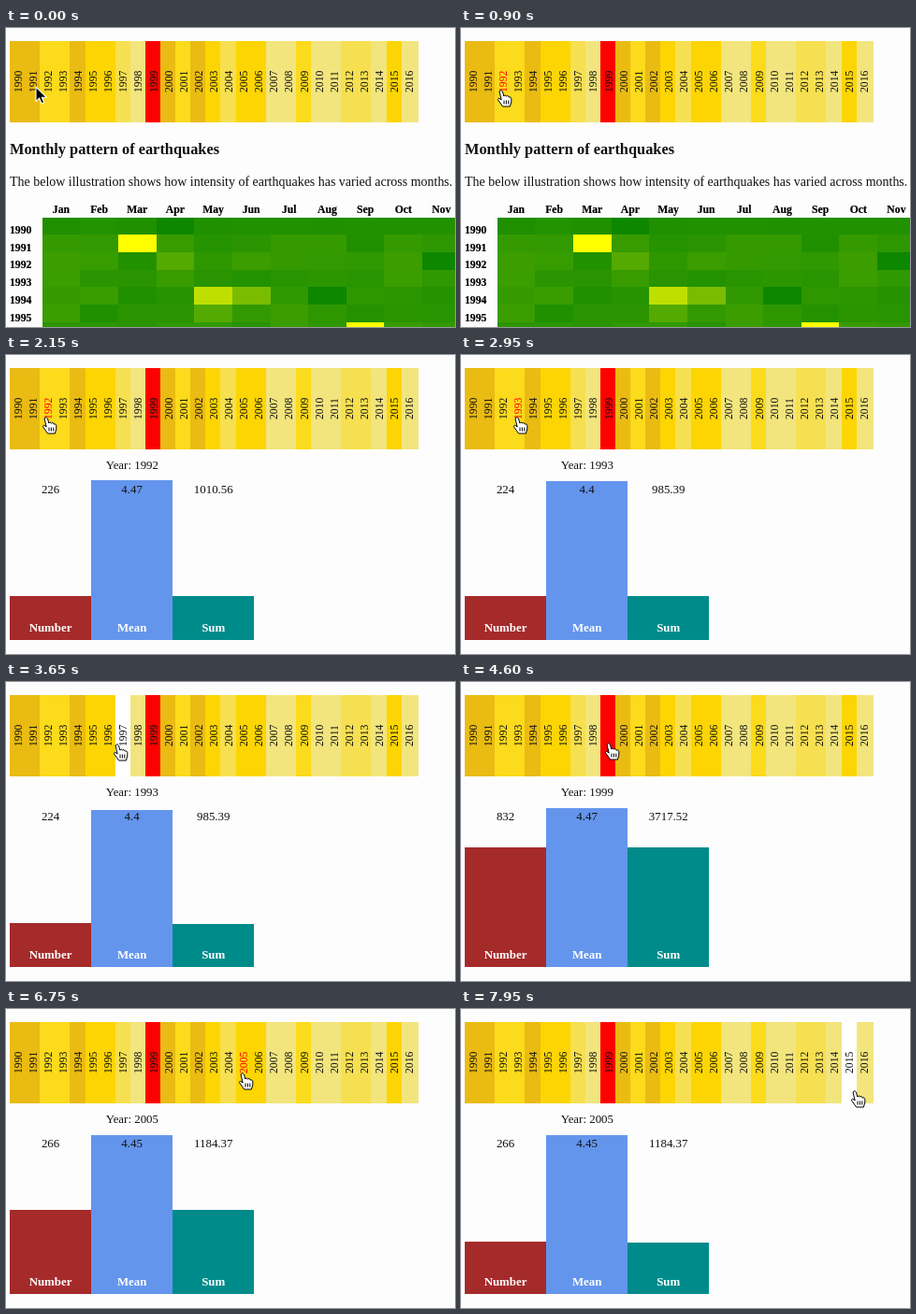
Write an HTML page that moves like this. It is 480 px wide and 320 px high and loops after 8 s.

```html
<!DOCTYPE html>
<html lang="en">
<head>
<meta charset="utf-8">
<title>Earthquakes by year</title>
<style>
html, body { margin: 0; width: 100%; height: 100%; overflow: hidden; background: #fefdfe; }
svg { display: block; width: 480px; height: 320px; font-family: "Liberation Serif", "Times New Roman", serif; fill: #111; }
.year { font-size: 11.7px; }
.grid { font-size: 11.7px; font-weight: bold; fill: #000; }
.grid text { stroke: #000; stroke-width: .2px; }
.mid { text-anchor: middle; }
.bars { font-size: 12.9px; }
.name { font-weight: bold; fill: #fff; }
rect { shape-rendering: crispEdges; }
</style>
</head>
<body>
<svg id="stage" viewBox="0 0 480 320"></svg>
<script>
const LOOP = 8000;
const LEFT = 4;
const stage = document.getElementById('stage');

function add(parent, tag, attrs, text) {
  const node = document.createElementNS('http://www.w3.org/2000/svg', tag);
  for (const key in attrs) node.setAttribute(key, attrs[key]);
  if (text !== undefined) node.textContent = text;
  parent.appendChild(node);
  return node;
}
const lerp = (a, b, k) => a + (b - a) * k;
const mix = (a, b, k) => `rgb(${a.map((v, i) => Math.round(lerp(v, b[i], k)))})`;

// Year strip: each cell is a little wider than its step, so the next one overlaps it
const FIRST = 1990, YEARS = 27, STEP = 16.1, CELL = 18.5;
const KHAKI = [240, 230, 140], GOLD = [255, 215, 0], ROD = [218, 165, 32];
const tiers = [
  { color: '#f00', years: [1999] },
  { color: mix(GOLD, ROD, .57), years: [1990, 1991, 1994, 2000, 2002] },
  { color: mix(GOLD, ROD, .05), years: [1995, 1996, 2003, 2005, 2006, 2015] },
  { color: mix(KHAKI, GOLD, .8), years: [1992, 1993, 2001, 2009] },
  { color: mix(KHAKI, GOLD, .42), years: [1997, 2004, 2012, 2013] }
];
const quiet = { color: mix(KHAKI, GOLD, .1) };
const strip = add(stage, 'g', {});
const cells = Array.from({ length: YEARS }, (_, i) => {
  const x = LEFT + i * STEP;
  const { color } = tiers.find(tier => tier.years.includes(FIRST + i)) || quiet;
  return { x, color, rect: add(strip, 'rect', { x, y: 14, width: CELL, height: 87 }) };
});
cells.forEach((cell, i) => {
  const transform = `translate(${cell.x + 12.6} 69) rotate(-90)`;
  cell.label = add(strip, 'text', { class: 'year', transform }, FIRST + i);
});

// Monthly table
const table = add(stage, 'g', {});
add(table, 'text', { x: LEFT, y: 135, 'font-size': 16.36, 'font-weight': 'bold' }, 'Monthly pattern of earthquakes');
add(table, 'text', { x: LEFT, y: 169, 'font-size': 13.98 },
  'The below illustration shows how intensity of earthquakes has varied across months.');

const grid = add(table, 'g', { class: 'grid' });
const GRID_X = 38.6, GRID_Y = 202.5, COL = 40.65, ROW = 18.7;
const months = 'Jan Feb Mar Apr May Jun Jul Aug Sep Oct Nov'.split(' ');
const peaks = {
  'Mar 1991': 1, 'Sep 1996': 1, 'May 1994': .75, 'Jun 1994': .48,
  'Apr 1992': .33, 'May 1995': .33, 'Apr 1990': .05, 'Nov 1992': .05, 'Aug 1994': .05
};
let seed = 7;
const random = () => (seed = seed * 16807 % 2147483647) / 2147483647;

months.forEach((month, c) =>
  add(grid, 'text', { class: 'mid', x: GRID_X + (c + .5) * COL, y: 198 }, month));
for (let r = 0; r < 7; r++) {
  const year = FIRST + r;
  months.forEach((month, c) => {
    const level = peaks[month + ' ' + year] ?? .12 + (r ? .12 : .02) * random();
    add(grid, 'rect', {
      x: GRID_X + c * COL, y: GRID_Y + r * ROW, width: COL, height: ROW,
      fill: mix([0, 128, 0], [255, 255, 0], level)
    });
  });
  add(grid, 'text', { x: LEFT, y: GRID_Y + 17.5 + r * ROW }, year);
}

// Bar chart
const chart = add(stage, 'g', { class: 'bars mid' });
const FLOOR = 305, FULL = 174, BAR = 87.1, GROW = 1000;
const title = add(chart, 'text', { x: 134.8, y: 122 });
const bars = [['Number', '#a52a2a', 832], ['Mean', '#6495ed', 4.55], ['Sum', '#008b8b', 3717.52]]
  .map(([name, fill, max], i) => {
    const x = LEFT + i * BAR, mid = x + BAR / 2;
    const rect = add(chart, 'rect', { x, width: BAR, fill });
    add(chart, 'text', { class: 'name', x: mid, y: 296 }, name);
    return { rect, max, value: add(chart, 'text', { x: mid, y: 148 }) };
  });
const picks = [
  { at: 1100, year: 1992, values: [226, 4.47, 1010.56] },
  { at: 2600, year: 1993, values: [224, 4.4, 985.39] },
  { at: 4050, year: 1999, values: [832, 4.47, 3717.52] },
  { at: 6170, year: 2005, values: [266, 4.45, 1184.37] }
];
const cubicInOut = k => k < .5 ? 4 * k ** 3 : 1 - 4 * (1 - k) ** 3;

function drawChart(t) {
  const current = picks.findLastIndex(pick => t >= pick.at);
  table.style.display = current < 0 ? '' : 'none';
  chart.style.display = current < 0 ? 'none' : '';
  if (current < 0) return;
  const { at, year, values } = picks[current];
  const before = current ? picks[current - 1].values : [0, 0, 0];
  const k = cubicInOut(Math.min(1, (t - at) / GROW));
  title.textContent = 'Year: ' + year;
  bars.forEach((bar, i) => {
    const height = lerp(before[i], values[i], k) / bar.max * FULL;
    bar.rect.setAttribute('y', FLOOR - height);
    bar.rect.setAttribute('height', height);
    bar.value.textContent = values[i];
  });
}

// Pointer
const arrow = add(stage, 'path', {
  d: 'M0 0V15.5L3.6 12.2L6 17.8L8.7 16.6L6.3 11.2H11.2Z', fill: '#000', stroke: '#fff', 'stroke-width': 1.1
});
const hand = add(stage, 'path', {
  d: 'M-2 1Q0-2 1.5 1L2.8 6Q4 3.5 5.4 6Q7 4 8.2 7Q10 6 10.8 8.5V12L9.4 17H1.6L-3.6 9.6Q-3 7-1 9L.2 10Z' +
     'M3 10.5v4m2.4-4v4m2.4-4v4',
  fill: '#fff', stroke: '#000', 'stroke-linejoin': 'round'
});
const stops = [
  { from: 0, to: 350, x: 32, y: 63 },
  { from: 700, to: 2250, x: 43, y: 67 },
  { from: 2500, to: 3250, x: 60, y: 67 },
  { from: 3500, to: 3700, x: 119, y: 67 },
  { from: 3950, to: 5100, x: 158, y: 66 },
  { from: 5350, to: 5500, x: 237, y: 64 },
  { from: 5800, to: 6950, x: 253, y: 69 },
  { from: 7450, to: LOOP, x: 421, y: 88 }
];

function pointerAt(t) {
  const i = stops.findIndex(stop => t <= stop.to);
  const stop = stops[i];
  if (t >= stop.from) return [stop.x, stop.y];
  const last = stops[i - 1];
  const k = (t - last.to) / (stop.from - last.to);
  return [lerp(last.x, stop.x, k), lerp(last.y, stop.y, k)];
}

function drawPointer(t) {
  const [x, y] = pointerAt(t);
  const isArrow = t < 500 || (t > 5150 && t < 5600);
  arrow.style.display = isArrow ? '' : 'none';
  hand.style.display = isArrow ? 'none' : '';
  (isArrow ? arrow : hand).setAttribute('transform', `translate(${x} ${y})`);

  // Hover trails the pointer slightly
  const [hx, hy] = pointerAt(Math.max(0, t - 100));
  const over = t < 500 ? -1 : Math.floor((hx - LEFT) / STEP);
  cells.forEach((cell, i) => {
    const dx = hx - cell.x;
    const onText = dx > 4.5 && dx < 13.5 && hy > 45 && hy < 70;
    cell.rect.setAttribute('fill', i === over && !onText ? '#fff' : cell.color);
    cell.label.setAttribute('fill', i === over && onText ? '#f00' : '#111');
  });
}

function draw() {
  const t = performance.now() % LOOP;
  drawChart(t);
  drawPointer(t);
  requestAnimationFrame(draw);
}
draw();
</script>
</body>
</html>
```
